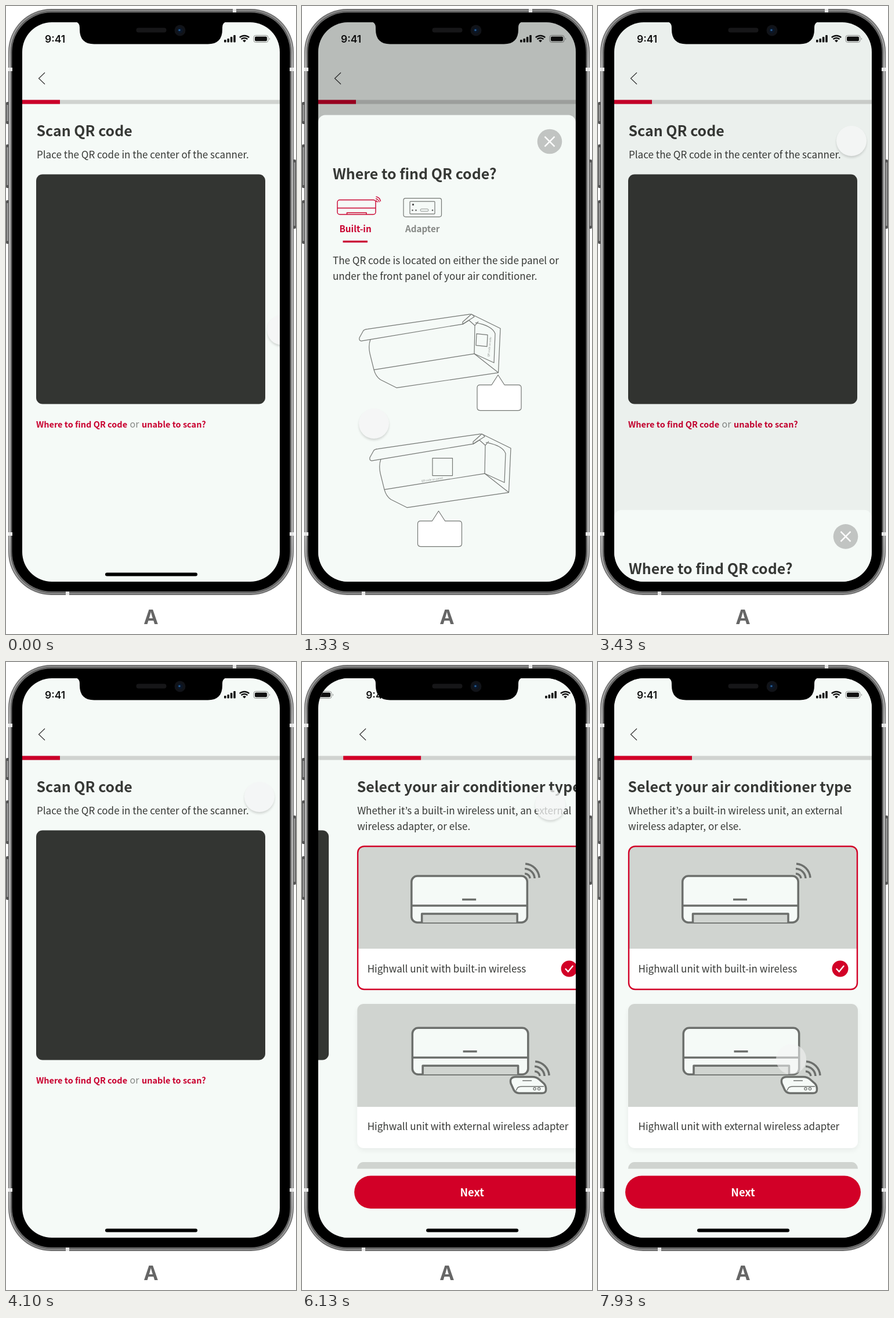
An HTML page that plays this animation: 500 px wide and 1080 px high, repeating every 8000 ms.

```html
<!DOCTYPE html>
<html lang="en">
<head>
<meta charset="utf-8">
<title>Scan QR code</title>
<style>
html, body { margin: 0; width: 100%; height: 100%; overflow: hidden; background: #fff; }
svg { display: block; width: 500px; height: 1080px; }
text { font-family: "Noto Sans CJK JP", "Noto Sans CJK SC", "Noto Sans CJK", sans-serif; font-size: 17.05px; fill: #363835; }
.h { font-size: 24.95px; font-weight: 600; }
.b { font-size: 14.5px; font-weight: 600; }
.tab { font-size: 15.2px; font-weight: 600; }
.red { fill: #c9002f; }
.grey { fill: #858885; }
.clock { font: 600 17.5px Inter, sans-serif; fill: #111; }
.tiny { font-size: 4.6px; fill: #8b8e8b; }
.line { fill: none; stroke: #747774; stroke-width: 1.2; stroke-linejoin: round; }
.unit { fill: #f5faf7; stroke: #6c6f6c; stroke-width: 3.5; stroke-linejoin: round; }
.none { fill: none; }
</style>
</head>
<body>
<svg viewBox="0 0 500 1080" xmlns="http://www.w3.org/2000/svg">
  <defs>
    <clipPath id="screen"><rect x="28" y="28" width="444" height="962" rx="51"/></clipPath>
    <clipPath id="card"><rect x="52" y="588" width="396" height="248" rx="11"/></clipPath>
    <linearGradient id="metal" x2="0" y2="1">
      <stop offset="0" stop-color="#858585"/><stop offset=".1" stop-color="#bbb"/>
      <stop offset=".9" stop-color="#bbb"/><stop offset="1" stop-color="#858585"/>
    </linearGradient>
    <filter id="soft" x="-30%" y="-30%" width="160%" height="160%"><feGaussianBlur stdDeviation="2"/></filter>
    <filter id="wide" x="-10%" y="-10%" width="120%" height="120%"><feGaussianBlur stdDeviation="5"/></filter>

    <g id="bar">
      <text class="clock" x="67" y="62.5">9:41</text>
      <g fill="#111">
        <rect x="376" y="58" width="3.6" height="4.5" rx="1"/><rect x="381.4" y="56" width="3.6" height="6.5" rx="1"/>
        <rect x="386.8" y="53" width="3.6" height="9.5" rx="1"/><rect x="392.2" y="50" width="3.6" height="12.5" rx="1"/>
        <path d="M408 59.5a4.5 4.5 0 0 1 6 0l-3 3z"/>
        <rect x="429" y="52.5" width="21" height="8" rx="2"/><path d="M454 54.5q2 2 0 4z" opacity=".5"/>
      </g>
      <path d="M402.8 54.2a12 12 0 0 1 16.4 0M405.5 57.2a8 8 0 0 1 11 0" fill="none" stroke="#111" stroke-width="2.4"/>
      <rect x="427" y="50.5" width="25" height="12" rx="3.6" fill="none" stroke="#8b8d8b"/>
      <path d="M67 114.5L56.5 124.5 67 134.5" fill="none" stroke="#333" stroke-width="1.2"/>
      <rect x="28" y="161.5" width="444" height="7" fill="#d0d3d0"/>
      <rect x="171" y="974.5" width="159" height="6" rx="3" fill="#000"/>
    </g>

    <g id="ac">
      <rect class="unit" x="145.7" y="368" width="199.5" height="80" rx="10"/>
      <path class="unit" d="M146 419H345M233 408.5H257"/>
      <path class="unit" d="M163.5 448V433H328V448" style="fill:#d0d4d0"/>
    </g>
    <path id="waves" d="M1-9A9 9 0 0 1 10-1M1-17.5A17.5 17.5 0 0 1 18-1M2-26A26 26 0 0 1 26-2" class="unit none"/>

    <g id="box" class="line">
      <path d="M117 572L102 574.5Q98 574 99 569L106 556.5Q108 554.5 113 554L289 528.5Q294 528 297 533L277 545.5Z"/>
      <path d="M118 572Q114 582 117 596L124 624Q127 635 135 641L163 655 338.5 629 297 596.5 124 624"/>
      <path d="M277 546V542L292 528.5 342 553 338.5 629M277 546L288 539 298 548 297 596.5M298 548L304 541M299 543Q328 548 333 562L331 612 297 596.5"/>
    </g>
    <path id="tip" class="line" d="M-31 17H-11L0 0 11 17H35Q40 17 40 22V56Q40 61 35 61H-31Q-36 61-36 56V22Q-36 17-31 17Z" style="fill:#fff"/>
  </defs>

  <g id="phone">
    <g fill="#555">
      <rect x="0" y="165" width="7" height="38" rx="2"/><rect x="0" y="238" width="7" height="75" rx="2"/>
      <rect x="0" y="334" width="7" height="75" rx="2"/><rect x="494" y="264" width="6" height="119" rx="2"/>
    </g>
    <g fill="#aaa">
      <rect x="1.5" y="170" width="2" height="28"/><rect x="1.5" y="243" width="2" height="65"/>
      <rect x="1.5" y="339" width="2" height="65"/><rect x="496.5" y="269" width="2" height="109"/>
    </g>
  </g>

  <g clip-path="url(#screen)">
    <rect x="28" y="28" width="444" height="962" fill="#f5faf7"/>
    <g id="scan">
      <use href="#bar"/>
      <rect x="28" y="161.5" width="65" height="7" fill="#cb0029"/>
      <text class="h" x="52.5" y="224">Scan QR code</text>
      <text x="53" y="262">Place the QR code in the center of the scanner.</text>
      <rect x="52" y="289.5" width="395" height="395" rx="11" fill="#333532"/>
      <rect id="found" x="73" y="311" width="353" height="352" fill="#fff"/>
      <text class="b red" x="52" y="725">Where to find QR code</text>
      <text class="grey" x="213.5" y="725" style="font-size:16px">or</text>
      <text class="b red" x="234" y="725">unable to scan?</text>
    </g>

    <g id="pick">
      <rect x="28" y="28" width="444" height="962" fill="#f5faf7"/>
      <use href="#bar"/>
      <rect x="28" y="161.5" width="134" height="7" fill="#d20027"/>
      <text class="h" x="51.5" y="224">Select your air conditioner type</text>
      <text x="52" y="262">Whether it’s a built-in wireless unit, an external</text>
      <text x="52" y="289">wireless adapter, or else.</text>

      <rect x="53" y="317" width="394" height="246" rx="11" fill="#fff"/>
      <path d="M53 493V328a11 11 0 0 1 11-11H436a11 11 0 0 1 11 11V493Z" fill="#d0d4d0"/>
      <rect x="53" y="317" width="394" height="246" rx="11" fill="none" stroke="#d20027" stroke-width="2.4"/>
      <use href="#ac"/><use href="#waves" x="340" y="373"/>
      <text x="69.5" y="534">Highwall unit with built-in wireless</text>
      <circle cx="417.5" cy="527.5" r="14" fill="#d20027"/>
      <path d="M411.5 528L415.7 532.5 423.5 523" fill="none" stroke="#fff" stroke-width="2.4" stroke-linecap="round"/>

      <rect x="52" y="592" width="396" height="248" rx="11" fill="#000" opacity=".05" filter="url(#wide)"/>
      <g clip-path="url(#card)">
        <rect x="52" y="588" width="396" height="248" fill="#fff"/>
        <rect x="52" y="588" width="396" height="177" fill="#d0d4d0"/>
      </g>
      <use href="#ac" x="1.5" y="261.3"/><use href="#waves" x="357" y="713"/>
      <path class="unit" d="M325 713.5H354Q361 713.5 366 718L374 725Q377 728 377.5 734Q378 741.5 371 741.5H331Q325 741 322 736L317 725Q314 714 325 713.5Z"/>
      <path d="M337 720H353M326 737L328 733Q330 730 336 730H374" fill="none" stroke="#6c6f6c" stroke-width="1.4"/>
      <g fill="none" stroke="#6c6f6c" stroke-width="1.2"><circle cx="358" cy="734" r="2.2"/><circle cx="365.5" cy="734" r="2.2"/></g>
      <text x="69.5" y="805">Highwall unit with external wireless adapter</text>

      <path d="M52 871.5a11 11 0 0 1 11-11.5H437a11 11 0 0 1 11 11.5Z" fill="#d0d4d0"/>
      <rect x="47" y="883.5" width="406" height="56.5" rx="28.2" fill="#d20027"/>
      <text x="250" y="918.7" text-anchor="middle" style="font-size:18.3px;font-weight:700;fill:#fff">Next</text>
    </g>

    <rect id="dim" x="28" y="28" width="444" height="962"/>

    <g id="sheet">
      <rect x="28" y="186" width="443.5" height="830" rx="12" fill="#f5faf7"/>
      <circle cx="427" cy="231.5" r="21.3" fill="#c1c4c2"/>
      <path d="M418.5 223L435.5 240M435.5 223L418.5 240" stroke="#fff" stroke-width="2.4"/>
      <text class="h" x="53" y="296">Where to find QR code?</text>
      <g fill="none" stroke="#c9002f" stroke-width="1.4">
        <rect x="61" y="332" width="66" height="25" rx="4"/>
        <path d="M61 346H127M77.5 357V354H111V357M127 333.5a3 3 0 0 1 3 2.5M127 330a6.5 6.5 0 0 1 6 6M127.5 326.5a9.5 9.5 0 0 1 8 8"/>
      </g>
      <g class="line">
        <rect x="175" y="329" width="65.5" height="32" rx="3.5"/><rect x="186" y="334.5" width="43" height="21.5" rx="1"/>
        <rect x="204" y="347.5" width="14" height="4" rx="2" stroke-width=".8"/>
      </g>
      <g fill="#555"><rect x="190" y="338.5" width="3" height="3"/><circle cx="190.5" cy="349.7" r="1.2"/><circle cx="196.5" cy="349.7" r="1.2"/><circle cx="225" cy="349.7" r="1.2"/></g>
      <text class="tab red" x="64.5" y="387.5">Built-in</text>
      <text class="tab grey" x="178" y="387.5">Adapter</text>
      <rect x="70.5" y="402" width="42.5" height="3.2" fill="#c9002f"/>
      <text x="53" y="442">The QR code is located on either the side panel or</text>
      <text x="53" y="469">under the front panel of your air conditioner.</text>
      <use href="#box"/><use href="#box" x="18" y="206"/>
      <path class="line" d="M301 562L320 564 319 584 300 582Z" stroke-width=".8"/>
      <path class="line" d="M225 776H259.5V806H225Z" stroke-width=".8"/>
      <text class="tiny" transform="translate(323 602) rotate(-84)">QR code on side</text>
      <text class="tiny" transform="translate(206 817) rotate(-8)">QR code on panel</text>
      <use href="#tip" x="338" y="633"/><use href="#tip" x="235.5" y="867"/>
    </g>

    <g id="touch">
      <circle id="shade" cy="3" r="25.5" opacity=".2" filter="url(#soft)"/>
      <circle r="26" fill="#f5f6f6"/>
    </g>
  </g>

  <path d="M119 27Q127 28 127 37V40Q127 65.500 152 65.500H348Q373 65.500 373 40V37Q373 28 381 27Z"/>
  <rect x="224.5" y="37.5" width="52" height="8" rx="4" fill="#161618"/>
  <circle cx="300" cy="42" r="9.5" fill="#111318"/><circle cx="300" cy="42" r="5" fill="#0b1626"/><circle cx="299" cy="41.5" r="1.8" fill="#245a92"/>
  <text x="250" y="1063.3" text-anchor="middle" style="font:700 34px Inter,sans-serif;fill:#666">A</text>
</svg>
<script>
const $ = id => document.getElementById(id);

function add(tag, attrs) {
  const el = document.createElementNS("http://www.w3.org/2000/svg", tag);
  for (const k in attrs) el.setAttribute(k, attrs[k]);
  $("phone").append(el);
}

// Nested shells of the case: inset, fill
for (const [d, fill] of [[0, "#606060"], [1.2, "url(#metal)"], [4, "#555"], [5.5, "#8a8a8a"], [6.3, "#000"]])
  add("rect", { x: 4 + d, y: 5 + d, width: 492 - 2 * d, height: 1008 - 2 * d, rx: 74 - d, fill });

// Antenna breaks
for (const [x, y, width, height] of [[391, 5, 6, 6], [103, 1007, 6, 6], [4, 106, 7, 6], [489, 106, 7, 6], [4, 905, 7, 6], [489, 905, 7, 6]])
  add("rect", { x, y, width, height, fill: "#e6e6e6" });

const unit = v => Math.min(1, Math.max(0, v));
const out = (t, start, span, power) => 1 - (1 - unit((t - start) / span)) ** power;
const smooth = p => p * p * (3 - 2 * p);

// Touch path: time, x, y, opacity
const path = [
  [0, 476, 557, .82], [730, 124, 718, .82], [1800, 124, 718, .82],
  [2370, 474, 217, .82], [2530, 474, 217, .82], [2700, 437, 232, .82],
  [4970, 437, 232, .82], [5180, 428, 246, .75], [7080, 428, 246, .75],
  [7130, 428, 246, .6], [7470, 428, 246, .6], [7930, 333, 683, .55], [8000, 333, 683, .55]
];

function touchAt(t) {
  const i = path.findIndex(k => k[0] > t), a = path[i - 1], b = path[i];
  const p = smooth((t - a[0]) / (b[0] - a[0]));
  return a.map((v, j) => v + (b[j] - v) * p);
}

function draw(t) {
  const open = out(t, 1070, 330, 4) - out(t, 3270, 430, 4);
  $("dim").setAttribute("opacity", .25 * open);
  $("sheet").setAttribute("transform", `translate(0 ${804 * (1 - open)})`);
  $("found").setAttribute("opacity", out(t, 4400, 200, 2));

  // The push starts, hangs, then runs on
  const push = t < 5200 ? 0 : .145 + .855 * out(t, 5970, 330, 3.25);
  $("scan").setAttribute("transform", `translate(${-444 * push} 0)`);
  $("pick").setAttribute("transform", `translate(${444 * (1 - push)} 0)`);

  const [, x, y, alpha] = touchAt(t);
  $("touch").setAttribute("transform", `translate(${x} ${y})`);
  $("touch").setAttribute("opacity", alpha);
  $("shade").setAttribute("opacity", t < 7100 ? .2 : 0);
}

const start = performance.now();
function tick() {
  draw((performance.now() - start) % 8000);
  requestAnimationFrame(tick);
}
tick();
</script>
</body>
</html>
```
